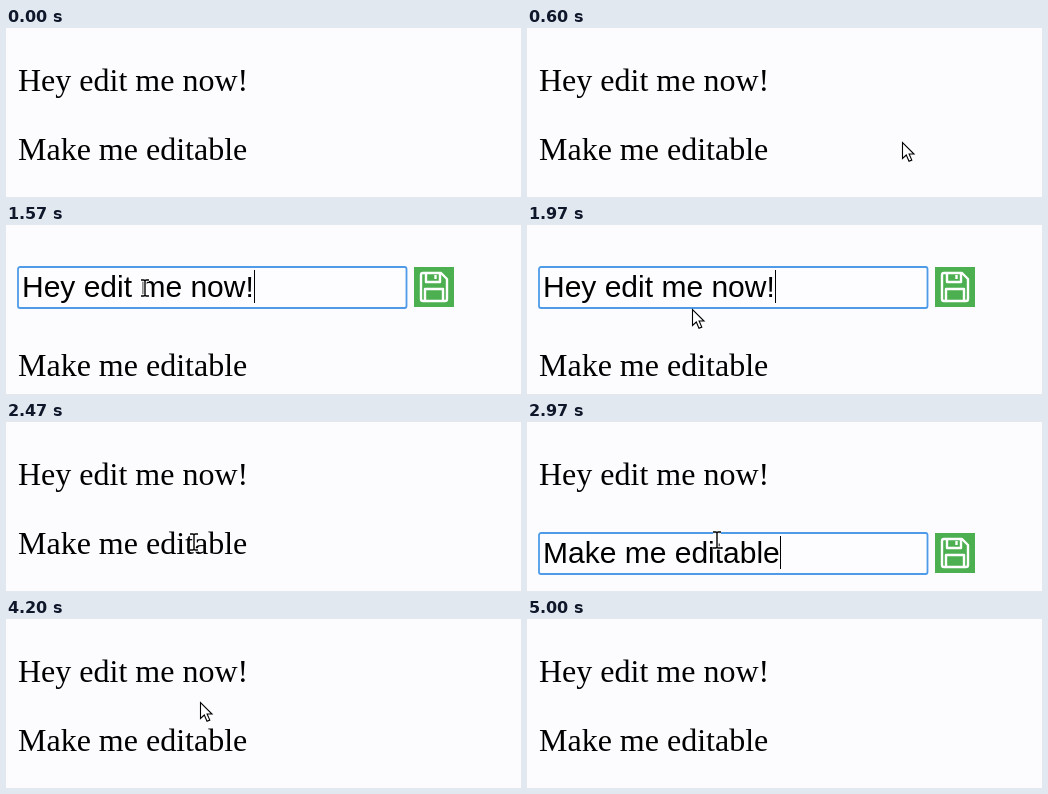
Write an HTML page that moves like this. It is 515 px wide and 169 px high and loops after 5030 ms.

```html
<!DOCTYPE html>
<html lang="en">
<head>
<meta charset="utf-8">
<title>Inline editing</title>
<style>
  html, body { margin: 0; width: 100%; height: 100%; overflow: hidden; background: #fcfcff; }
  svg { display: block; width: 515px; height: 169px; }
  .label { font: 32px "Liberation Serif", "Times New Roman", serif; }
  .value { font: 30px "Liberation Sans", Arial, sans-serif; }
</style>
</head>
<body>
<svg viewBox="0 0 515 169">
  <text id="first" class="label" x="12">Hey edit me now!</text>
  <text id="second" class="label" x="12">Make me editable</text>

  <g id="editor">
    <rect x="12" y="1" width="388.5" height="41" rx="2" fill="#fdfdff" stroke="#4f9be8" stroke-width="1.8"/>
    <text id="value" class="value" x="16" y="31"></text>
    <rect id="caret" y="4" width="1" height="33"/>
    <rect x="408" y="1" width="40" height="40" fill="#4caf50"/>
    <g fill="none" stroke="#fff" stroke-width="2.4" stroke-linejoin="round">
      <path d="M417 7H435L441 13V33Q441 35 439 35H417Q415 35 415 33V9Q415 7 417 7Z"/>
      <path d="M420 7V16H434V7M429.5 9V13M419 35V23H437V35"/>
    </g>
  </g>

  <path id="arrow" d="M.5 .5V16.5L4.3 13L7 19.3L9.8 18.1L7.1 12H12Z" fill="#fff" stroke="#000" stroke-width="1.1"/>
  <g id="beam" fill="none">
    <path d="M-4-8H-1L0-7L1-8H4M0-7V7M-4 8H-1L0 7L1 8H4" stroke="#fff" stroke-width="3.4"/>
    <path d="M-4-8H-1L0-7L1-8H4M0-7V7M-4 8H-1L0 7L1 8H4" stroke="#000" stroke-width="1.4"/>
  </g>
</svg>
<script>
const LOOP = 5030;
const BLINK = 600;
const EXTRA_HEIGHT = 19;
const $ = id => document.getElementById(id);
const show = (node, on) => node.setAttribute("display", on ? "inline" : "none");

const fields = [
  { node: $("first"), baseline: 63, top: 41, open: 1420, close: 2280, caretX: 248 },
  { node: $("second"), baseline: 132, top: 110, open: 2600, close: 3850, caretX: 253 }
];

// Pointer stops: time, x, y
const stops = [
  [520, 390, 117], [1080, 130, 59], [1440, 132, 57], [1700, 146, 68],
  [1970, 165, 84], [2270, 186, 121], [2700, 190, 118], [3250, 190, 118],
  [3650, 190, 90], [3900, 190, 90], [4150, 194, 83], [4320, 194, 83], [4660, 464, 141]
];
const POINTER_OUT = 4700;

function pointerAt(t) {
  if (t < stops[0][0] || t >= POINTER_OUT) return null;
  const next = stops.findIndex(stop => stop[0] > t);
  if (next < 0) return stops[stops.length - 1].slice(1);
  const [t0, x0, y0] = stops[next - 1];
  const [t1, x1, y1] = stops[next];
  const p = (t - t0) / (t1 - t0);
  const k = p * p * (3 - 2 * p);
  return [x0 + (x1 - x0) * k, y0 + (y1 - y0) * k];
}

function overText([x, y], active) {
  return fields.some(field => {
    if (field === active) return x > 11 && x < 401 && y > field.top && y < field.top + 42;
    const baseline = field.baseline + (active === fields[0] ? EXTRA_HEIGHT : 0);
    return x > 12 && x < 242 && y > baseline - 28 && y < baseline + 8;
  });
}

function render(t) {
  const active = fields.find(field => t >= field.open && t < field.close);
  fields.forEach((field, i) => {
    const shift = i === 1 && active === fields[0] ? EXTRA_HEIGHT : 0;
    field.node.setAttribute("y", field.baseline + shift);
    show(field.node, field !== active);
  });

  show($("editor"), active);
  if (active) {
    $("editor").setAttribute("transform", `translate(0 ${active.top})`);
    $("value").textContent = active.node.textContent;
    $("caret").setAttribute("x", active.caretX);
    show($("caret"), Math.floor((t - active.open) / BLINK) % 2 === 0);
  }

  const pointer = pointerAt(t);
  const beam = pointer && overText(pointer, active);
  show($("beam"), beam);
  show($("arrow"), pointer && !beam);
  if (pointer) {
    const place = `translate(${pointer.map(Math.round).join(" ")})`;
    $(beam ? "beam" : "arrow").setAttribute("transform", place);
  }
}

const start = performance.now();
function tick() {
  render((performance.now() - start) % LOOP);
  requestAnimationFrame(tick);
}
tick();
</script>
</body>
</html>
```
